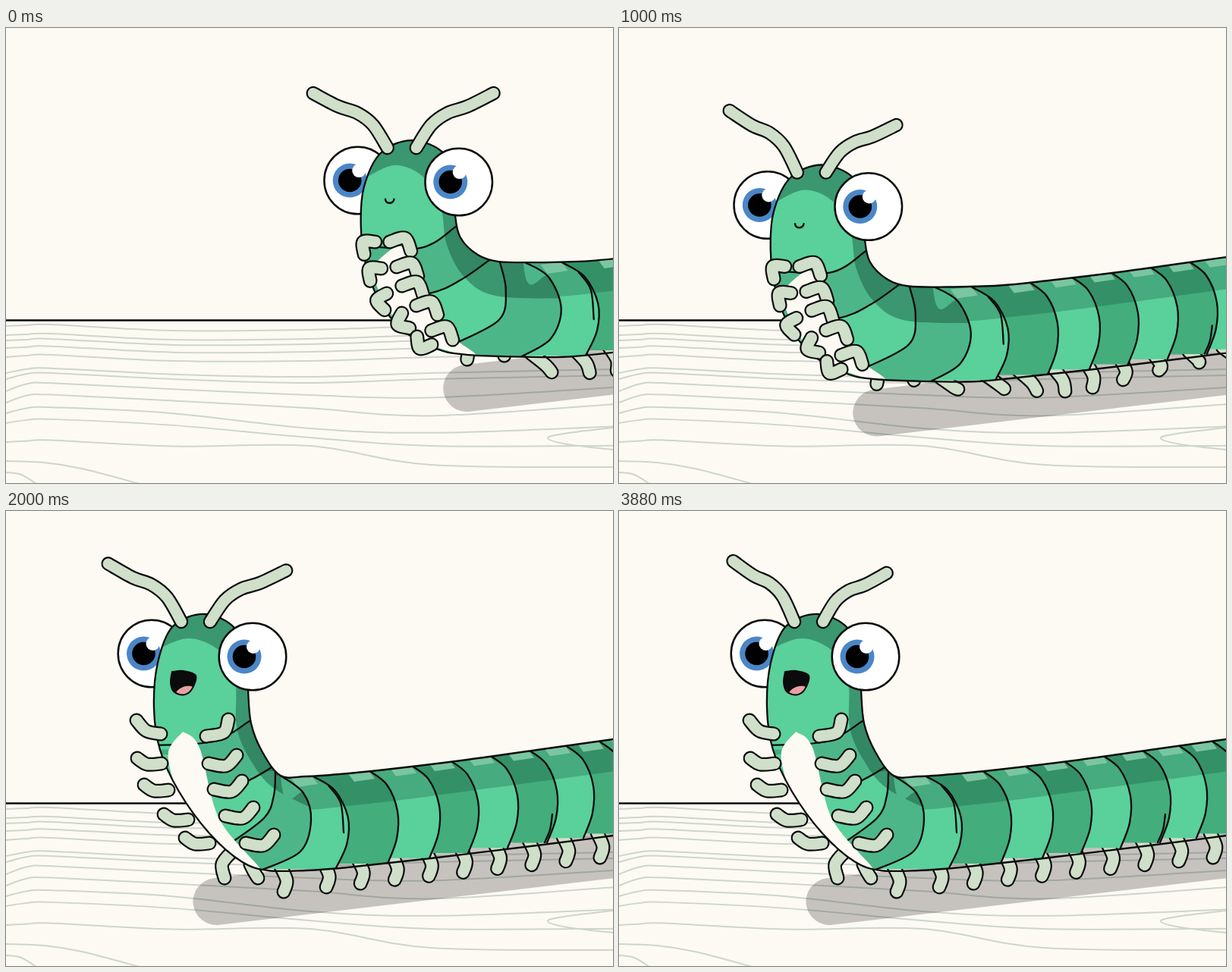
An HTML page with a canvas that plays this animation: 800 by 600 pixels, repeating every 3920 ms.

```html
<!DOCTYPE html>
<html>
<head>
<meta charset="utf-8">
<style>
html, body { margin: 0; width: 100%; height: 100%; overflow: hidden; background: #fdfaf3; }
canvas { display: block; }
</style>
</head>
<body>
<canvas id="stage" width="800" height="600"></canvas>
<script>
const ctx = document.getElementById('stage').getContext('2d');
const LOOP = 3920;
const INK = '#0b0b0b', LIGHT = '#5ad09a', MID = '#4db688', DARK = '#43ad7c', LIMB = '#cfdfc9', PAPER = '#fdfaf3';

const clamp = v => Math.max(0, Math.min(1, v));
const ease = (t, a, b) => { const u = clamp((t - a) / (b - a)); return u * u * (3 - 2 * u); };
const lerp = (a, b, u) => a + (b - a) * u;
const bell = (v, center, width) => Math.exp(-(((v - center) / width) ** 2));

// Value at t from [time, value, slope] keys.
function hermite(keys, t) {
  if (t >= keys[keys.length - 1][0]) return keys[keys.length - 1][1];
  const i = keys.findIndex(k => k[0] > t) - 1;
  const [t0, v0, s0] = keys[i], [t1, v1, s1] = keys[i + 1];
  const h = t1 - t0, u = (t - t0) / h, u2 = u * u, u3 = u2 * u;
  return v0 * (2 * u3 - 3 * u2 + 1) + v1 * (3 * u2 - 2 * u3) + h * (s0 * (u3 - 2 * u2 + u) + s1 * (u3 - u2));
}

// Smooth path through flat x,y pairs; optional tail points are joined by lines.
function spline(p, tail) {
  const path = new Path2D(), n = p.length / 2;
  const at = i => { const k = Math.max(0, Math.min(n - 1, i)) * 2; return [p[k], p[k + 1]]; };
  path.moveTo(p[0], p[1]);
  for (let i = 0; i < n - 1; i++) {
    const [a, b, c, d] = [at(i - 1), at(i), at(i + 1), at(i + 2)];
    path.bezierCurveTo(b[0] + (c[0] - a[0]) / 6, b[1] + (c[1] - a[1]) / 6,
      c[0] - (d[0] - b[0]) / 6, c[1] - (d[1] - b[1]) / 6, c[0], c[1]);
  }
  if (tail) {
    for (let i = 0; i < tail.length; i += 2) path.lineTo(tail[i], tail[i + 1]);
    path.closePath();
  }
  return path;
}

const sideOf = (p, dx, dy) =>
  spline(p, [p[p.length - 2] + dx, p[p.length - 1] + dy, p[0] + dx, p[1] + dy]);

function fill(path, color) { ctx.fillStyle = color; ctx.fill(path); }
function stroke(path, color = INK, width = 2.3) {
  ctx.strokeStyle = color; ctx.lineWidth = width; ctx.stroke(path);
}
function disc(x, y, r, color) {
  const path = new Path2D();
  path.arc(x, y, r, 0, Math.PI * 2);
  fill(path, color);
  return path;
}
function limb(points, width = 19) {
  const path = spline(points);
  stroke(path, INK, width);
  stroke(path, LIMB, width - 4.4);
}

// A wood grain line is set by its height at the left edge.
function grain(y) {
  const kink = y - 2 - 9 * bell(y, 485, 35);
  return spline([0, y, 28, kink + 1, 60, kink, 220, kink + 8,
    400, y + 5 + 18 * bell(y, 514, 14),
    560, y + 30 * clamp((y - 465) / 50),
    800, y - 5 + 38 * ease(y, 480, 530)]);
}
const wood = [393, 405, 412, 422, 434, 455, 463, 479, 494, 508, 521, 546].map(grain);
wood.push(spline([0, 571, 50, 573, 100, 581, 176, 601]),
  spline([0, 586, 20, 589, 40, 601]),
  spline([800, 527, 735, 535, 714, 541, 740, 549, 800, 556]));

// LOW: crouched, where the walk starts. HIGH: raised, where it ends.
const LOW_BACK = [700, 309, 650, 308, 622, 299, 599, 276, 592, 245, 590, 205, 577, 165, 535, 148];
const HIGH_BACK = [395, 350, 362, 349, 338, 318, 323, 280, 319, 235, 318, 200, 302, 155, 262, 136];
const LOW_FACE = [494, 165, 472, 210, 468, 260, 474, 310, 490, 355, 520, 396, 565, 422, 610, 431];
const HIGH_FACE = [220, 152, 200, 200, 195, 260, 203, 315, 228, 370, 268, 425, 310, 462, 345, 474];
const LOW_SHADE = [470, 200, 512, 181, 550, 196, 573, 235, 581, 285, 604, 328, 645, 353, 735, 357];
const HIGH_SHADE = [192, 186, 240, 168, 282, 185, 302, 225, 304, 285, 322, 328, 352, 365, 408, 394];
const LOW_BELLY = [515, 286, 486, 315, 494, 352, 520, 391, 560, 418, 620, 432, 566, 386, 540, 304, 515, 286];
const HIGH_BELLY = [233, 291, 214, 318, 223, 362, 247, 406, 287, 450, 336, 474, 281, 406, 255, 312, 233, 291];
const CHIN = [[600, 257, 593, 262, 546, 290, 460, 286], [330, 271, 321, 277, 272, 304, 190, 309]];
const NECK = [[640, 304, 600, 332, 558, 350, 480, 358], [358, 333, 318, 356, 272, 368, 215, 372]];
const CHEST = [[651, 308, 659, 345, 650, 385, 590, 417], [355, 343, 353, 375, 340, 405, 290, 442]];
const FRONT = [[682, 308, 715, 328, 732, 370, 718, 410, 680, 433], [362, 349, 392, 372, 402, 408, 388, 449, 338, 473]];
const EYES = [[464, 201, 597, 203], [192, 188, 325, 192]];
const FEELERS = [[503, 158, 541, 158], [231, 146, 269, 146]];
const MOUTH = [[506, 227], [234, 226]];
const FIRST_LEG = [[608, 422, 609, 430, 608, 437], [300, 447, 285, 465, 288, 484]];
const SECOND_LEG = [[656, 422, 656, 428, 657, 432], [322, 466, 327, 476, 332, 484]];
const LEFT_ROOTS = [[487, 282, 495, 317, 502, 350, 522, 376, 542, 407], [204, 294, 205, 333, 214, 368, 240, 407, 268, 438]];
const RIGHT_ROOTS = [[506, 282, 515, 315, 522, 340, 541, 366, 561, 399], [264, 297, 267, 333, 274, 367, 289, 402, 316, 438]];

const ARC_X = [403, 478, 533, 584, 636, 688, 736, 780, 824];
const ARC_SHAPE = [0, 0, 24, 19, 38, 54, 37, 90, 25, 123];
const arcTop = (x, i) => [x, i ? 342 - (x - 478) * .131 : 349];
const arcs = ARC_X.map((x, i) =>
  ARC_SHAPE.map((v, k) => k % 2 ? arcTop(x, i)[1] + v : x + v * (i ? 1 : 1.25)));

const SLIDE = [[0, 0, .288], [640, 180, .266], [1000, 268, .215], [1360, 323, .07], [1600, 330, 0]];
const GAIT = [[0, 1.6, .001], [640, 2.3, .0018], [1000, 3.2, .0026], [1360, 4.2, .0026], [1750, 5, .001]];
const SPREAD = [[0, 100, 0], [560, 105, 0], [640, 103.5, -.03], [1000, 91, -.025], [1360, 84.5, 0], [2000, 98, 0]];
const TILT = [[0, 0, .01], [640, 13, 0], [1000, 9.5, -.015], [1360, 1.5, 0], [2000, 4.4, 0]];

function feelerPose(t) {
  if (t < 2000) return [hermite(SPREAD, t), hermite(TILT, t)];
  const a = (t - 2000) / 400 * Math.PI * 2;
  return [90 + 10 * Math.cos(a - .61), 8.5 + 4.5 * Math.cos(a - 2.7)];
}

function drawEye(x, y, dx) {
  stroke(disc(x, y, 44.3, '#fff'), INK, 2.5);
  disc(x + dx, y, 22.5, '#4b86c8');
  disc(x + dx, y, 15.3, '#000');
  disc(x + dx + 12, y - 13, 9, '#fff');
}

function drawMouth([x, y], open) {
  if (open < .45) {
    const smile = new Path2D();
    smile.arc(x, y - 2, 5.8, .1, Math.PI - .1);
    stroke(smile, INK, 2.4);
    return;
  }
  const lips = spline([-15, -14, 0, -15, 16, -9, 11, 9, 0, 16.5, -13, 12, -17, 0, -15, -14]);
  const tongue = new Path2D();
  tongue.ellipse(2, 13, 13, 7.5, -.35, 0, Math.PI * 2);
  ctx.save();
  ctx.translate(x, y);
  ctx.scale(1, clamp(.3 + open * .7));
  fill(lips, INK);
  ctx.save();
  ctx.clip(lips);
  fill(tongue, '#e8a2a2');
  ctx.restore();
  stroke(lips, INK, 2);
  ctx.restore();
}

function drawLegs(t, pose) {
  limb(pose(FIRST_LEG));
  limb(pose(SECOND_LEG));
  const walk = 1 - ease(t, 1360, 1800), peak = hermite(GAIT, t);
  for (let k = 0; k < 11; k++) {
    const x = k ? 377 + k * 45.1 : 366;
    const phase = (k + 2 - peak) * Math.PI / 4;
    const dx = walk * (12 + 12 * Math.cos(phase));
    const hang = lerp(36, 27 + 10 * Math.cos(phase - 1.8), walk);
    const y = 475 - (x - 366) * .108;
    limb([x - 4, y - 6, x + 4 + dx * .5, y + hang * .35, x + dx, y + hang - 9]);
  }
}

// Points of arm k on one side, as offsets from its root.
function armShape(k, side, rise, reach) {
  const turn = Math.max(0, k - 1) * .6;
  const polar = (r, a) => [r * Math.cos(a - turn), r * Math.sin(a - turn)];
  const low = side < 0 ? [...polar(16, Math.PI), ...polar(22, 2.3)] : [20, -5, 28, 12];
  const lift = k ? 0 : -11;
  const high = side < 0
    ? [-19, lift ? -4 : 1, -32, -7 + lift]
    : [23, lift ? -5 : 3, lift ? 29 : 37, -11 + lift];
  const far = side < 0 ? [0, 0, -9 - 4 * k, 6] : [0, 0, 4 + 3 * k, 1 - 1.5 * k];
  return low.map((v, i) => lerp(v, high[i], rise) + far[i] * reach);
}

function drawBody(pose) {
  const outline = spline([900, 287, 800, 301, 700, 315, 600, 329, 500, 341, 440, 347,
    ...pose([LOW_BACK, HIGH_BACK]), ...pose([LOW_FACE, HIGH_FACE]),
    395, 474, 450, 470, 560, 458, 700, 441, 800, 428, 900, 414]);
  const [chin, neck, chest, front] = [CHIN, NECK, CHEST, FRONT].map(pose);
  const shade = pose([LOW_SHADE, HIGH_SHADE]), n = shade.length;

  ctx.save();
  ctx.clip(outline);
  for (let i = arcs.length - 1; i >= 0; i--) fill(sideOf(arcs[i], -900, 0), i % 2 ? DARK : LIGHT);
  fill(spline([340, 396, 400, 394, 450, 389, 560, 376, 900, 330], [900, 200, 340, 200]), 'rgba(10,60,40,.25)');
  ARC_X.map(arcTop).forEach(([x, y]) =>
    fill(new Path2D(`M${x - 28} ${y + 3}L${x} ${y}L${x + 8} ${y + 11}L${x - 19} ${y + 15}Z`), '#7ac6a0'));
  fill(sideOf(front, -400, 0), MID);
  fill(sideOf(chest, -400, 0), LIGHT);
  fill(sideOf(neck, 0, -400), MID);
  fill(sideOf(chin, 0, -400), LIGHT);
  ctx.save();
  ctx.clip(sideOf([front[0] + 4, 0, ...front], -400, 0));
  fill(spline(shade, [shade[n - 2] + 40, shade[n - 1], shade[n - 2] + 40, 50, shade[0], 50]), 'rgba(10,60,40,.38)');
  ctx.restore();
  [...arcs, chin, neck, chest, front].forEach(line => stroke(spline(line)));
  stroke(spline([425, 362, 441, 385, 445, 424]));
  stroke(spline([720, 400, 717, 420, 710, 437]));
  fill(spline(pose([LOW_BELLY, HIGH_BELLY])), PAPER);
  ctx.restore();
  stroke(outline);
}

function drawFeelers(base, t) {
  const [spread, tilt] = feelerPose(t);
  const shape = [0, 0, -.19, -.42, -.4, -.64, -.65, -.76, -.98, -1];
  [-1, 1].forEach((side, k) => {
    const wide = spread * (side < 0 ? 1 : 1.04), tall = 72 - side * tilt;
    limb(shape.map((v, i) => i % 2 ? base[k * 2 + 1] + v * tall : base[k * 2] - side * v * wide), 18.5);
  });
}

function draw(t) {
  ctx.lineCap = ctx.lineJoin = 'round';
  ctx.fillStyle = PAPER;
  ctx.fillRect(0, 0, 800, 600);
  wood.forEach(line => stroke(line, '#cdd6cb', 2));
  stroke(new Path2D('M0 385.5H800'), INK, 2.4);

  const slide = 330 - hermite(SLIDE, t);
  const riseX = .88 * ease(t, 1110, 1350) + .12 * ease(t, 1350, 1680);
  const riseY = ease(t, 1110, 1370);
  const reach = ease(t, 1130, 1340) * (1 - ease(t, 1370, 1800));
  const raised = riseY > .5;
  const pose = ([low, high]) => high.map((v, i) =>
    i % 2 ? lerp(low[i] + 40, v, riseY) : lerp(low[i] - 330, v, riseX));
  const drawArms = (roots, side, from, to) => {
    const p = pose(roots);
    for (let k = from; k < to; k++) {
      const x = p[k * 2], y = p[k * 2 + 1];
      limb([x, y, ...armShape(k, side, riseY, reach).map((v, i) => v + (i % 2 ? y : x))]);
    }
  };

  ctx.save();
  ctx.translate(slide, -slide * 40 / 330);
  stroke(new Path2D('M277.5 515L977 432'), 'rgba(0,0,0,.22)', 62);
  drawLegs(t, pose);
  const eyes = pose(EYES);
  drawEye(eyes[0], eyes[1], -10.5);
  if (raised) drawArms(LEFT_ROOTS, -1, 3, 5);
  drawBody(pose);
  drawMouth(pose(MOUTH), riseY);
  drawArms(LEFT_ROOTS, -1, 0, raised ? 3 : 5);
  drawArms(RIGHT_ROOTS, 1, 0, 5);
  drawEye(eyes[2], eyes[3], -11);
  drawFeelers(pose(FEELERS), t);
  ctx.restore();
}

const start = performance.now();
function tick() {
  draw((performance.now() - start) % LOOP);
  requestAnimationFrame(tick);
}
tick();
</script>
</body>
</html>
```
